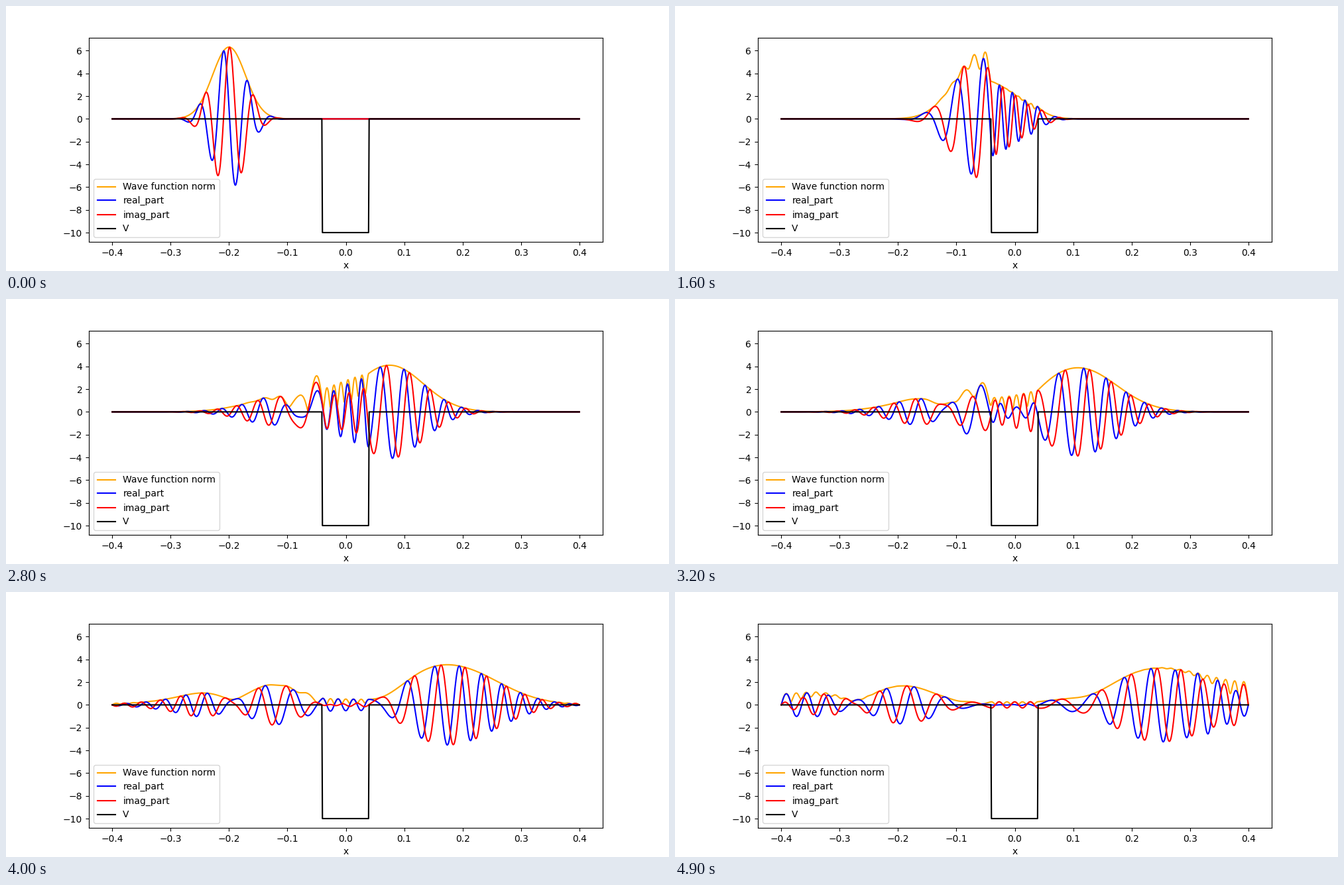
A matplotlib script that plays this animation: 1000 by 400 pixels, repeating every 5 s.

```python
import numpy as np
import matplotlib.pyplot as plt
from matplotlib.animation import FuncAnimation

# Wave packet crossing a square well, between hard walls
HBAR, MASS = 0.02, 1.0
X0, SIGMA, P0 = -0.2, 0.02, 3.0
DEPTH, HALF_WIDTH = 10.0, 0.04
FRAMES, INTERVAL = 50, 100
T_END = 0.14

x = np.linspace(-0.4, 0.4, 801)
dx = x[1] - x[0]
eps = dx / 10
inside = (x > -HALF_WIDTH - eps) & (x < HALF_WIDTH - eps)
V = np.where(inside, -DEPTH, 0.0)

amp = np.sqrt(2 / (SIGMA * np.sqrt(2 * np.pi)))
psi0 = amp * np.exp(-(x - X0) ** 2 / (4 * SIGMA ** 2) + 1j * P0 * x / HBAR)

# Finite-difference Hamiltonian on the inner points, solved exactly
hop = HBAR ** 2 / (2 * MASS * dx ** 2)
n = len(x) - 2
off = np.full(n - 1, -hop)
H = np.diag(2 * hop + V[1:-1]) + np.diag(off, 1) + np.diag(off, -1)
energy, modes = np.linalg.eigh(H)
coef = modes.T @ psi0[1:-1]


def wave(t):
    psi = np.zeros(len(x), complex)
    psi[1:-1] = modes @ (coef * np.exp(-1j * energy * t / HBAR))
    return psi


def parts(psi):
    return np.abs(psi), psi.real, psi.imag


plt.rcParams["font.family"] = "DejaVu Sans"
fig, ax = plt.subplots(figsize=(10, 4), dpi=100)
styles = [("orange", "Wave function norm"), ("blue", "real_part"), ("red", "imag_part")]
lines = [ax.plot(x, y, color=c, label=name)[0]
         for y, (c, name) in zip(parts(wave(0)), styles)]
ax.plot(x, V, color="black", label="V")
ax.set_xlim(-0.44, 0.44)
ax.set_ylim(-DEPTH - 0.05 * (amp + DEPTH), amp + 0.05 * (amp + DEPTH))
ax.set_xlabel("x")
ax.legend(loc="lower left")


def update(i):
    psi = wave(T_END * i / (FRAMES - 1))
    for line, y in zip(lines, parts(psi)):
        line.set_ydata(y)
    return lines


anim = FuncAnimation(fig, update, frames=FRAMES, interval=INTERVAL,
                     repeat=True, repeat_delay=0)
plt.show()
```
